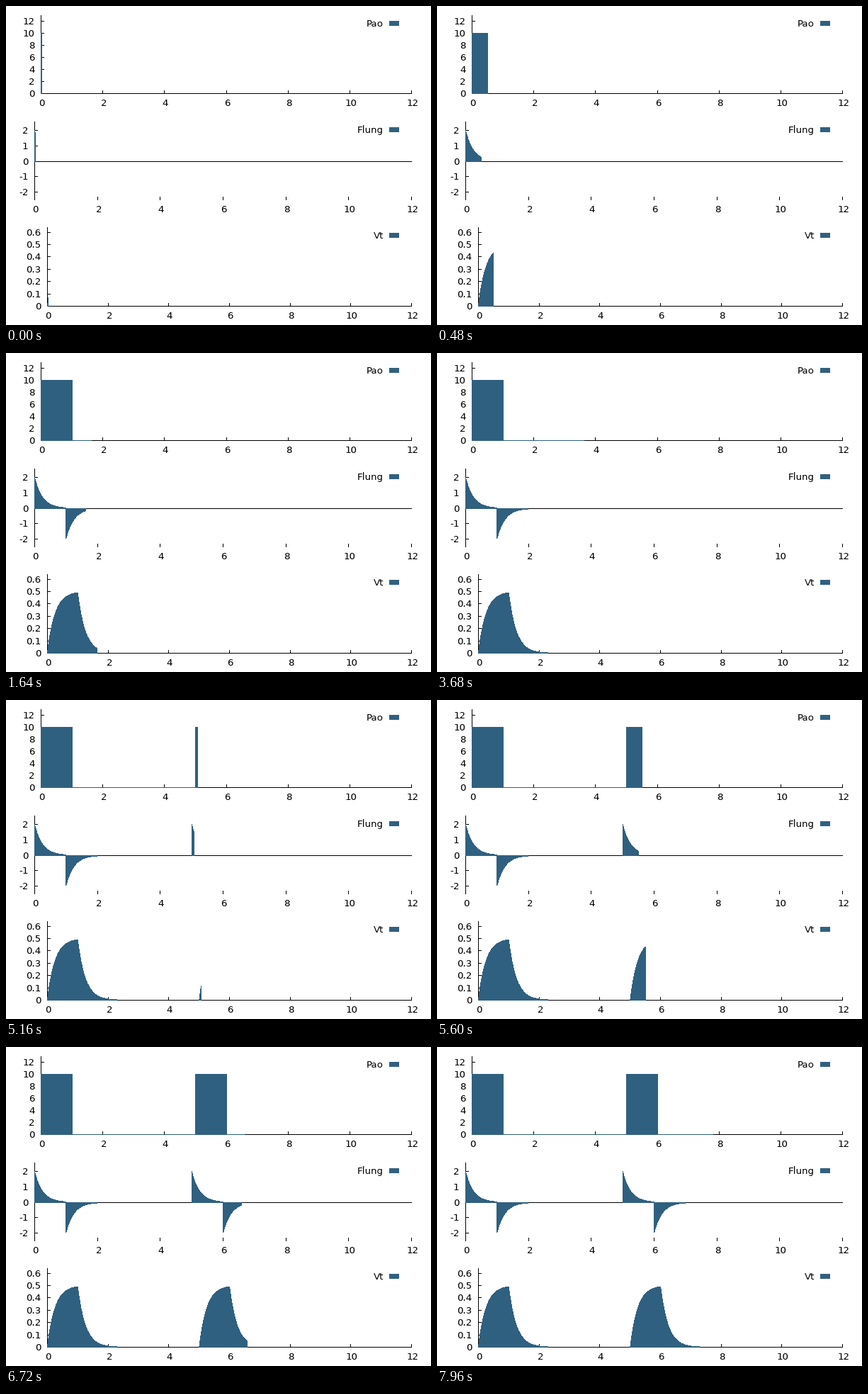
A matplotlib script that plays this animation: 600x450 px, repeating every 8 s.

```python
import numpy as np
import matplotlib.pyplot as plt
from matplotlib.animation import FuncAnimation
from matplotlib.collections import PolyCollection
from matplotlib.patches import Rectangle

plt.rcParams.update({
    "font.family": "DejaVu Sans",
    "text.hinting": "native",
    "text.hinting_factor": 8,
})

W, H, DPI = 600, 450, 100
FRAMES, INTERVAL = 200, 40
STEP_MS, SAMPLE_MS = 39, 3  # simulated time per frame and per sample
RIGHT = 572                 # pixel column of x = 12
STEEL = "#306080"
FONT = 10 * 96 / DPI

fig = plt.figure(figsize=(W / DPI, H / DPI), dpi=DPI, facecolor="white")
ax = fig.add_axes([0, 0, 1, 1])
ax.set_xlim(0, W)
ax.set_ylim(H, 0)
ax.axis("off")


def block(x, y, w, h, color="black"):
    ax.add_patch(Rectangle((x, y), w, h, facecolor=color, linewidth=0,
                           antialiased=False, zorder=1))


def label(x, y, text, ha):
    ax.text(x, y, text, ha=ha, va="baseline", fontsize=FONT, color="black")


def pressure(ms):
    return np.where(ms % 5000 < 1015, 10.0, 0.0)


def flow(ms):
    p = ms % 5000 / 1000
    peak = 2 * (1 - np.exp(-4))
    return np.where(p < 1, 2 * np.exp(-4 * p), -peak * np.exp(-4 * (p - 1)))


def volume(ms):
    p = ms % 5000 / 1000
    full = 0.5 * (1 - np.exp(-4))
    return np.where(p < 1, 0.5 * (1 - np.exp(-4 * p)),
                    full * np.exp(-4 * (p - 1)))


class Chart:
    def __init__(self, name, func, left, top, bottom, zero, unit, ticks,
                 key_y, keep_zero=False):
        self.func, self.left, self.zero, self.unit = func, left, zero, unit
        self.base = round(zero)
        self.scale = (RIGHT + 0.5 - left) / 12
        self.floor = 1 if keep_zero else 0

        block(left, top, 1, bottom - top + 1)
        block(left, self.base, RIGHT - left + 1, 1)
        for v in ticks:
            y = round(zero - unit * v)
            block(left, y, 5, 1)
            label(left - 8.5, y + 5, f"{v:g}", "right")
        for v in range(0, 13, 2):
            x = int(left + (RIGHT - left) * v / 12 + 0.5)
            block(x, bottom - 4, 1, 5)
            label(x + 1.8, bottom + 18, str(v), "center")
        label(533, key_y + 5, name, "right")
        block(541, key_y - 3, 14, 7, STEEL)

        self.bars = PolyCollection([], facecolors=STEEL, edgecolors="none",
                                   linewidths=0, antialiaseds=False, zorder=2)
        ax.add_collection(self.bars)

    def update(self, ms):
        cols = np.floor(self.left + 0.38 + self.scale * ms / 1000).astype(int)
        cols -= self.left
        px = self.base - np.rint(self.zero - self.unit * self.func(ms))
        px = px.astype(int)
        up = np.zeros(cols[-1] + 1, int)
        down = np.zeros_like(up)
        np.maximum.at(up, cols, px)
        np.maximum.at(down, cols, -px)

        filled = np.maximum(self.floor, (up + down > 0).astype(int))
        upper = np.repeat(self.base - up, 2)
        lower = np.repeat(self.base + down + filled, 2)
        edge = self.left + np.arange(len(up) + 1)
        x = np.repeat(edge, 2)[1:-1]
        outline = np.column_stack([np.r_[x, x[::-1]],
                                   np.r_[upper, lower[::-1]]])
        self.bars.set_verts([outline])


charts = [
    Chart("Pao", pressure, 49, 13, 123, 123, 8.5, range(0, 13, 2), 24, True),
    Chart("Flung", flow, 40, 163, 273, 218.7, 21.75, range(-2, 3), 174),
    Chart("Vt", volume, 58, 312, 423, 423, 174, np.arange(7) / 10, 323),
]


def draw(n):
    ms = np.arange(0, STEP_MS * (n + 1), SAMPLE_MS)
    for chart in charts:
        chart.update(ms)
    return [chart.bars for chart in charts]


anim = FuncAnimation(fig, draw, frames=FRAMES, interval=INTERVAL,
                     init_func=lambda: draw(0), repeat=True, repeat_delay=0)
plt.show()
```
